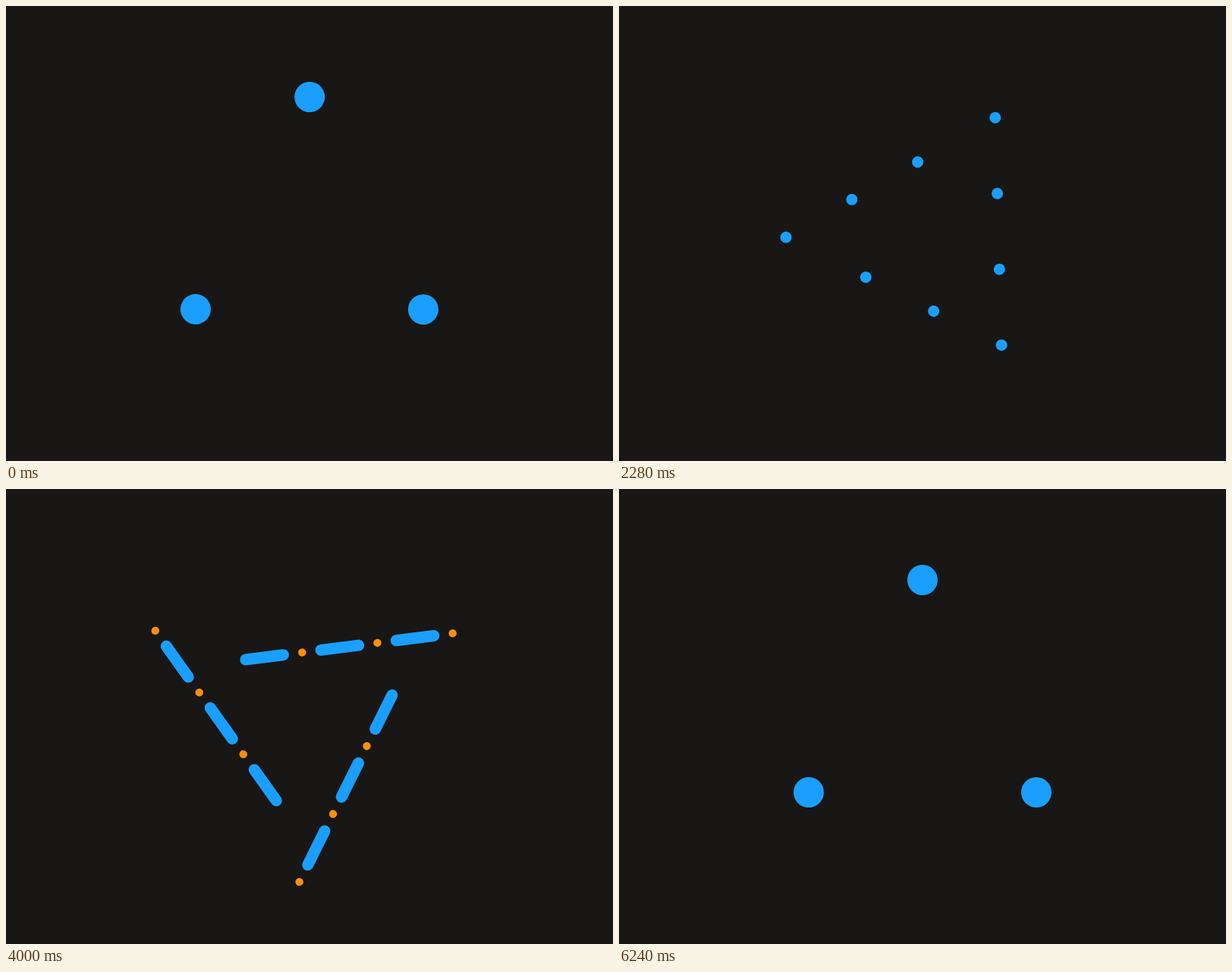
An HTML page with a canvas for the animation above (6.28 s loop, 800 by 600 pixels).

```html
<!DOCTYPE html>
<html lang="en">
<head>
<meta charset="utf-8">
<title>Turning triangle</title>
<style>
  html, body { margin: 0; width: 100%; height: 100%; overflow: hidden; background: #181715; }
  canvas { display: block; width: 800px; height: 600px; }
</style>
</head>
<body>
<canvas id="stage" width="800" height="600"></canvas>
<script>
const ctx = document.getElementById('stage').getContext('2d');
const LOOP = 6280, END = 6.24;
const BG = '#181715', BLUE = '#1a9fff', ORANGE = '#ff8f0b';
const CORNERS = [[0, -180], [150, 100], [-150, 100]];

const clamp = p => Math.min(1, Math.max(0, p));
const inOut = (p, power) => p < 0.5
  ? 0.5 * (2 * p) ** power
  : 1 - 0.5 * (2 - 2 * p) ** power;

// Value at time t of a list of [time, value] keys, eased between neighbours.
function track(t, keys, power = 5) {
  let [t0, v0] = keys[0];
  for (const [t1, v1] of keys) {
    if (t < t1) return v0 + (v1 - v0) * inOut(clamp((t - t0) / (t1 - t0)), power);
    t0 = t1;
    v0 = v1;
  }
  return v0;
}

const TRACKS = {
  spread: [[0.936, 0], [1.872, 100], [5.68, 100], [6.2, 0]],
  blueR: [[0.936, 20], [1.872, 7.5], [4.9, 7.5], [5.3, 0], [5.5, 0], [5.9, 20]],
  blueLen: [[2.2, 0], [3.136, 50], [4.07, 50], [5.006, 0]],
  orangeR: [[2.2, 0], [3.136, 5.2], [4.07, 5.2], [5.006, 22.5], [5.76, 22.5], [END, 0]],
  tail: [[5.002, 0], [5.938, 1]],
  head: [[4.7, 0], [5.5, 1]]
};
const SLIDE = [[3.2, 0], [3.62, 92.5], [3.84, 83.2], [4, 85], [4.04, 85], [4.58, 0]];

// Steady turn plus two eased half turns.
function angle(t) {
  const first = inOut(clamp(0.5 + (t - 2.07) / 3.09), 5);
  const pace = t < 4.95 ? 0.248 : 0.299;
  const second = inOut(clamp(0.5 + (t - 4.95) * pace), 5);
  return t >= END ? 0 : 2 * Math.PI * t / END + Math.PI * (first + second);
}

// Round-capped dashes on every side, from a to b, repeated three times.
function dashes(color, radius, a, b, step) {
  if (radius < 0.05) return;
  ctx.strokeStyle = color;
  ctx.lineWidth = radius * 2;
  ctx.beginPath();
  CORNERS.forEach(([x, y], i) => {
    const [nx, ny] = CORNERS[(i + 1) % 3];
    const len = Math.hypot(nx - x, ny - y);
    const ux = (nx - x) / len, uy = (ny - y) / len;
    for (let k = 0; k < 3; k++) {
      const s = a + k * step, e = Math.max(b, a + 0.01) + k * step;
      ctx.moveTo(x + ux * s, y + uy * s);
      ctx.lineTo(x + ux * e, y + uy * e);
    }
  });
  ctx.stroke();
}

function draw(t) {
  const v = {};
  for (const name in TRACKS) v[name] = track(t, TRACKS[name]);
  const slide = track(t, SLIDE, 2.5);
  const mid = slide + (v.spread + v.blueLen) / 2;

  ctx.setTransform(1, 0, 0, 1, 0, 0);
  ctx.fillStyle = BG;
  ctx.fillRect(0, 0, 800, 600);
  ctx.translate(400, 300);
  ctx.rotate(angle(t));
  ctx.lineCap = 'round';
  dashes(BLUE, v.blueR, slide, slide + v.blueLen, v.spread);
  dashes(ORANGE, v.orangeR, mid * (1 - v.tail), mid + 0.545 * v.spread * v.head, v.spread);
}

const start = performance.now();
function frame() {
  draw(((performance.now() - start) % LOOP) / 1000);
  requestAnimationFrame(frame);
}
frame();
</script>
</body>
</html>
```
